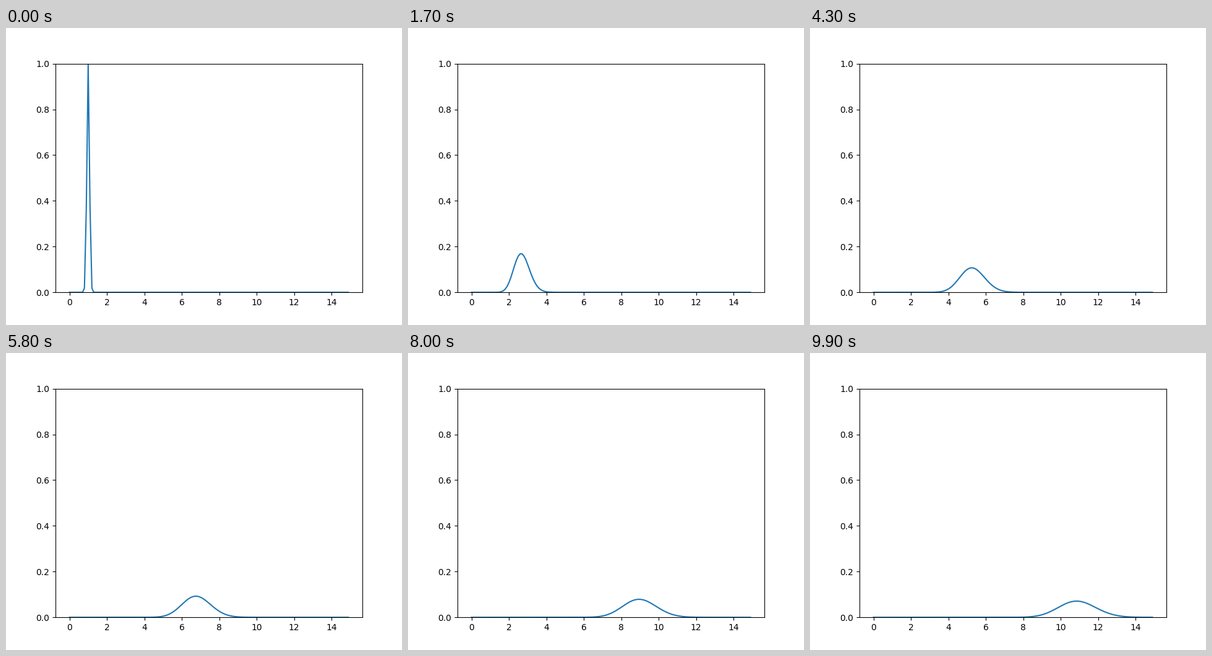
Write a matplotlib script that moves like this. It is 640 by 480 pixels and loops after 10000 ms.

```python
import numpy as np
import matplotlib.pyplot as plt
from matplotlib.animation import FuncAnimation

DX = 0.1
FRAMES = 100
STEP = 0.1  # model time per frame, wave speed 1

x = np.arange(0, 15, DX)
start = np.exp(-100 * (x - 1) ** 2)


def advect(t):
    """Exact solution of the upwind system du_j/dt = (u_{j-1} - u_j) / DX."""
    mean = t / DX
    # Poisson weights: chance of a shift by k cells
    ratios = np.concatenate(([1.0], mean / np.arange(1, x.size)))
    weights = np.exp(-mean) * np.cumprod(ratios)
    return np.convolve(start, weights)[:x.size]


fig, ax = plt.subplots(figsize=(6.4, 4.8), dpi=100)
line, = ax.plot(x, start)
ax.set_ylim(0, 1)


def update(i):
    line.set_ydata(advect(i * STEP))
    return line,


anim = FuncAnimation(fig, update, frames=FRAMES, interval=100, repeat=True)
plt.show()
```
